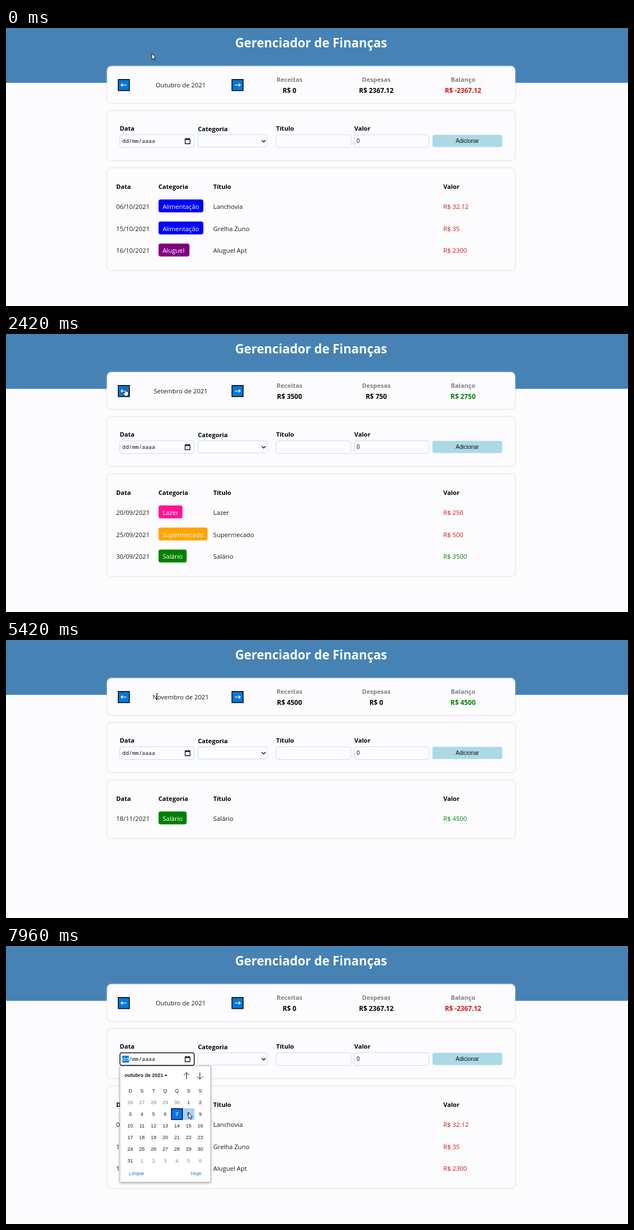
An HTML page that plays this animation: 1118x501 px, repeating every 8 s.

```html
<!DOCTYPE html>
<html lang="pt-BR">
<head>
<meta charset="utf-8">
<title>Gerenciador de Finanças</title>
<style>
html, body { margin: 0; width: 100%; height: 100%; overflow: hidden; background: #fcfcfe; }
svg { display: block; width: 100%; height: 100%; }
text { font: 11.35px "Open Sans", "Noto Sans", sans-serif; fill: #1c1c1c; white-space: pre; }
.title { font-size: 22.3px; font-weight: 700; fill: #fff; }
.label { font-size: 11.1px; font-weight: 700; fill: #000; }
.sum { font-size: 11.1px; font-weight: 700; fill: #808080; }
.total { font-size: 11.9px; font-weight: 700; fill: #000; }
.tag { fill: #fff; }
.ui { font: 10px "Liberation Sans", Arial, sans-serif; fill: #111; }
.mono { font: 9.8px "Noto Sans Mono", monospace; fill: #111; }
.day { font: 9px "Liberation Sans", Arial, sans-serif; }
.bold { font-weight: 700; }
.mid { text-anchor: middle; }
.card { fill: #fcfcfe; filter: drop-shadow(0 0 1.8px #cccbc0); }
.field { fill: #fcfcfe; stroke: #add8e6; stroke-width: .75; }
.nav { fill: #0078d7; stroke: #000; stroke-width: 1.5; }
.line { fill: none; stroke: #111; }
.popup { fill: #fff; stroke: #bbb; stroke-width: .7; filter: drop-shadow(0 1px 2px #0006); }
</style>
</head>
<body>
<svg id="stage" viewBox="0 0 1118 501"></svg>
<script>
const stage = document.getElementById('stage');
const LOOP = 8000, ROW = 39.7;
const RED = '#d81414', GREEN = '#008000';

const text = (x, y, str, cls = '', fill = '') =>
  `<text x="${x}" y="${y}" class="${cls}"${fill && ` style="fill:${fill}"`}>${str}</text>`;
const rect = (x, y, w, h, r, attrs) =>
  `<rect x="${x}" y="${y}" width="${w}" height="${h}" rx="${r}" ${attrs}/>`;
const path = (d, attrs) => `<path d="${d}" ${attrs}/>`;
const card = (y, h) => rect(181.6, y, 733.5, h, 7.5, 'class="card"');

// Category: colour and tag width
const categories = {
  'Alimentação': ['#00f', 80.5],
  'Aluguel': ['#800080', 55.5],
  'Lazer': ['#ff1493', 43],
  'Supermecado': ['#ffa500', 88],
  'Salário': [GREEN, 50.5],
};

const months = [
  { name: 'Setembro', totals: [3500, 750, 2750], rows: [
    ['20/09/2021', 'Lazer', 'Lazer', 250],
    ['25/09/2021', 'Supermecado', 'Supermecado', 500],
    ['30/09/2021', 'Salário', 'Salário', 3500]] },
  { name: 'Outubro', totals: [0, 2367.12, -2367.12], rows: [
    ['06/10/2021', 'Alimentação', 'Lanchovia', 32.12],
    ['15/10/2021', 'Alimentação', 'Grelha Zuno', 35],
    ['16/10/2021', 'Aluguel', 'Aluguel Apt', 2300]] },
  { name: 'Novembro', totals: [4500, 0, 4500], rows: [
    ['18/11/2021', 'Salário', 'Salário', 4500]] },
];

function monthView({ name, totals, rows }) {
  const sums = totals.map((v, i) => text(509.5 + 156 * i, 116.5, 'R$ ' + v, 'total mid',
    i < 2 ? '' : v < 0 ? RED : GREEN));
  const lines = rows.map(([date, cat, title, value], i) => {
    const y = 326 + ROW * i, [color, width] = categories[cat];
    return text(198, y, date)
      + rect(274.2, y - 17, width, 23.3, 3.7, `fill="${color}"`)
      + text(281.4, y, cat, 'tag') + text(372.5, y, title)
      + text(786, y, 'R$ ' + value, '', cat === 'Salário' ? GREEN : RED);
  });
  return `<g class="month">${card(252.8, 64.4 + ROW * rows.length)}
    ${text(314, 106.5, name + ' de 2021', 'mid')}${sums.join('')}${lines.join('')}</g>`;
}

const navButton = (x, dir) => rect(x - 10, 92.8, 20, 20, 0, 'class="nav"')
  + path(`M${x - 5 * dir} 102.8h${10 * dir}m${-3 * dir} -2.8l${3 * dir} 2.8l${-3 * dir} 2.8`,
    'fill="none" stroke="#fff" stroke-width="1.2"');

const CELL = 20.96, GRID_X = 212.9, GRID_Y = 271.5;

function calendar() {
  let out = rect(205, 216.3, 162.5, 209, 0, 'class="popup"')
    + text(213, 236.3, 'outubro de 2021', 'day bold')
    + path('M285 232h5l-2.5 3z', 'fill="#111"')
    + path('M324.5 240v-12m-5 5l5 -5l5 5M348.5 228v12m-5 -5l5 5l5 -5', 'class="line"')
    + rect(0, 0, CELL, CELL, 0, 'id="hover" fill="#a9d1ff"')
    + rect(GRID_X + 4 * CELL + .7, GRID_Y + CELL + .7, CELL - 1.4, CELL - 1.4, 0,
      'fill="#0075ff" stroke="#000" stroke-width="1.5"');
  [...'DSTQQSS'].forEach((d, i) => out += text(GRID_X + CELL * (i + .5), 264.2, d, 'day mid'));
  for (let i = 0; i < 42; i++) {
    const n = i - 4, inside = n > 0 && n < 32;
    out += text(GRID_X + CELL * (i % 7 + .5), GRID_Y + CELL * Math.floor(i / 7) + 13.6,
      n < 1 ? n + 30 : inside ? n : n - 31,
      'day mid' + (n === 7 ? ' bold' : ''), n === 7 ? '#fff' : inside ? '' : '#808080');
  }
  return out + text(221, 413, 'Limpar', 'day', '#1a76c4') + text(332.5, 413, 'Hoje', 'day', '#1a76c4');
}

const labels = (names, xs, y, cls) => names.map((n, i) => text(xs[i], y, n, cls)).join('');

stage.innerHTML = rect(0, 0, 1118, 98.8, 0, 'fill="#4682b4"')
  + text(548.3, 34.5, 'Gerenciador de Finanças', 'title mid')
  + card(68.7, 66.2) + card(149.6, 88.6)
  + navButton(211.8, -1) + navButton(416.2, 1)
  + labels(['Receitas', 'Despesas', 'Balanço'], [509.5, 665.5, 821.5], 97, 'sum mid')
  + labels(['Data', 'Título', 'Valor'], [204.5, 485.5, 626], 185, 'label')
  + text(345, 186, 'Categoria', 'label')
  + [[204.5, 134, 23], [345, 125, 22], [485.5, 134.5, 23], [626, 134, 23]]
    .map(([x, w, h]) => rect(x, 192.4, w, h, 3.7, 'class="field"')).join('')
  + rect(766.5, 192.5, 125.5, 22, 3.7, 'fill="#add8e6"')
  + text(829.2, 207, 'Adicionar', 'ui mid') + text(630.3, 207, '0', 'ui')
  + text(209, 207, 'dd/mm/aaaa', 'mono')
  + path('M322 199.8h8.6v8.7h-8.6zM322 201h8.6M324 198v2M328.6 198v2', 'class="line" stroke-width="1.3"')
  + path('M459.8 202.3l3.4 3.2l3.4 -3.2', 'class="line" stroke-width="1.5"')
  + months.map(monthView).join('')
  + labels(['Data', 'Categoria', 'Título', 'Valor'], [198, 274, 372.5, 786], 290, 'label')
  + `<g id="picker">${rect(204.8, 192.5, 133.6, 22.8, 3.7, 'class="line" stroke-width="1.5"')
    + rect(209, 197.8, 12, 12.2, 0, 'fill="#0078d7"')
    + text(209, 207, 'dd', 'mono', '#fff') + calendar()}</g>`
  + `<g id="cursor" stroke-linejoin="round">
    ${path('M0 0V10.6L2.4 8.5L4 12.1L5.6 11.4L4.1 7.9H7.4Z', 'fill="#fff" stroke="#000" stroke-width=".9"')}
    ${path('M-1 .5Q0 -.8 1 .5V5L5 6Q6.3 6.5 6 8.5L5 12V14H-1.5V12L-4 8.5Q-4.4 7 -3 7.2L-1 9Z',
      'fill="#fff" stroke="#000" stroke-width=".9"')}
    ${path('M-2 -5.5H2M0 -5.5V5.5M-2 5.5H2', 'class="line" stroke-width=".8"')}</g>`;

const monthViews = stage.querySelectorAll('.month');
const [picker, hover, cursor] = ['picker', 'hover', 'cursor'].map(id => document.getElementById(id));
const show = (el, on) => el.style.display = on ? '' : 'none';

// Pointer route: time, x, y
const route = [
  [0, 262, 46], [130, 262, 46], [750, 251, 39], [920, 251, 39], [1420, 216, 91],
  [1710, 215, 95], [1750, 215, 95], [1830, 214, 98], [2400, 214, 98], [2920, 232, 100],
  [3460, 404, 103], [3750, 412, 103], [3830, 412, 103], [4210, 413, 103], [5060, 413, 103],
  [5620, 214, 101.6], [6000, 214, 101.6], [6380, 216, 109], [6460, 216, 109],
  [6750, 312, 190], [6960, 312, 190], [7250, 326, 203], [7400, 326, 203],
  [7960, 328, 300], [LOOP, 328, 300],
];
// Clicks: time, month shown afterwards
const clicks = [[0, 1], [2130, 0], [3830, 1], [4790, 2], [5790, 1]];
const PICKER_OPENS = 7300;

function pointerAt(t) {
  const i = route.findIndex(p => p[0] > t);
  const [t0, x0, y0] = route[i - 1], [t1, x1, y1] = route[i];
  const u = (t - t0) / (t1 - t0), e = u * u * (3 - 2 * u);
  return [x0 + (x1 - x0) * e, y0 + (y1 - y0) * e];
}

const within = (x, y, left, top, right, bottom) => x >= left && x <= right && y >= top && y <= bottom;

function draw(now) {
  const t = now % LOOP;
  const [x, y] = pointerAt(t);
  const month = clicks.filter(c => c[0] <= t).pop()[1];
  monthViews.forEach((el, i) => show(el, i === month));

  const open = t >= PICKER_OPENS;
  show(picker, open);
  const col = Math.floor((x - GRID_X) / CELL), row = Math.floor((y - GRID_Y) / CELL);
  show(hover, open && within(col, row, 0, 0, 6, 5));
  hover.setAttribute('x', GRID_X + col * CELL);
  hover.setAttribute('y', GRID_Y + row * CELL);

  const onButton = within(x, y, 201, 90, 223, 114) || within(x, y, 403, 90, 428, 114);
  const shape = onButton ? 1 : within(x, y, 262, 94, 366, 111) ? 2 : 0;
  [...cursor.children].forEach((el, i) => show(el, i === shape));
  cursor.setAttribute('transform', `translate(${x} ${y})`);
  requestAnimationFrame(draw);
}
requestAnimationFrame(draw);
</script>
</body>
</html>
```
